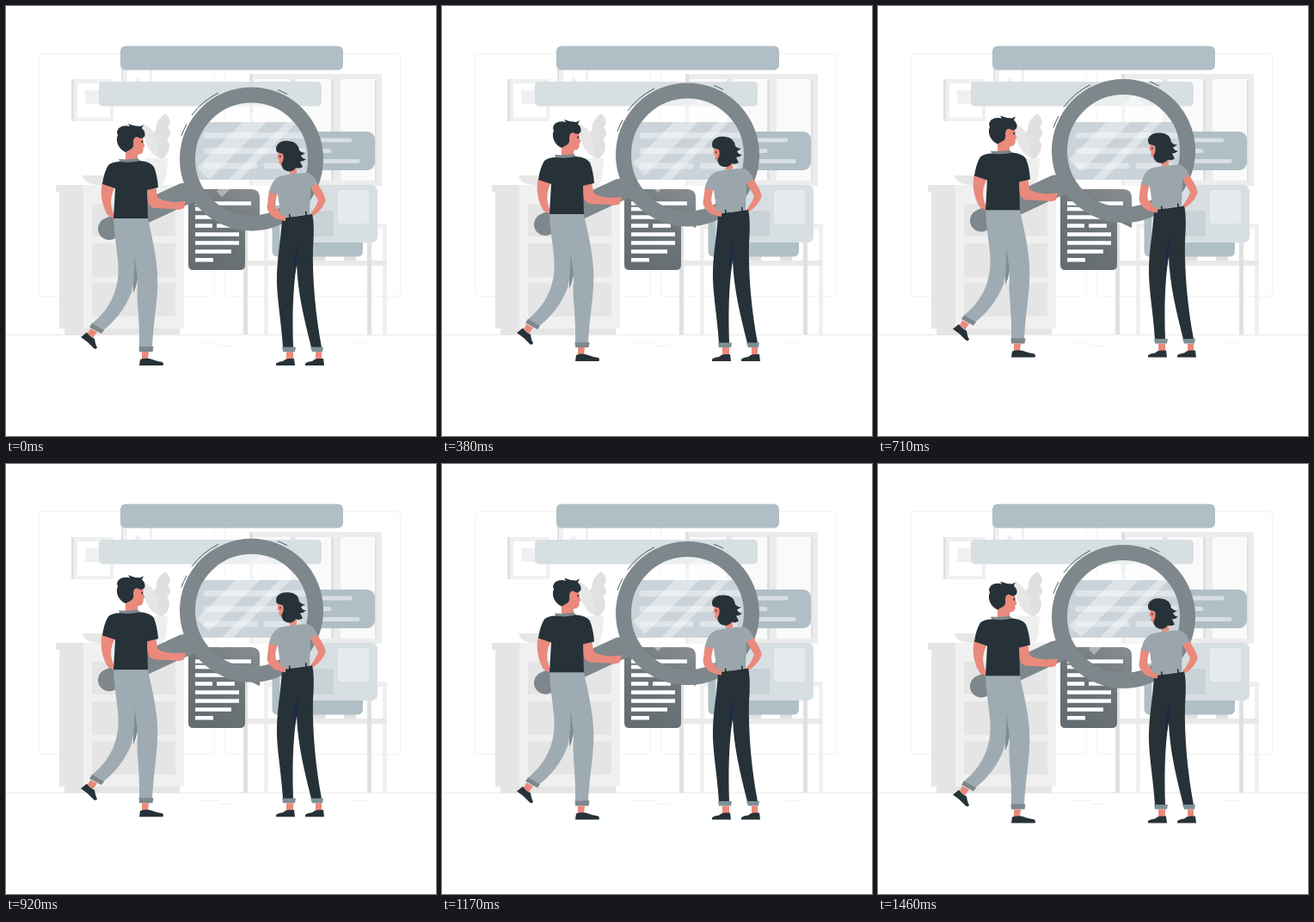
An HTML page for the animation above (1.5 s loop, 500x500 px).

```html
<!DOCTYPE html>
<html lang="en">
<head>
<meta charset="utf-8">
<title>Search illustration</title>
<style>
  html, body { margin: 0; width: 100%; height: 100%; overflow: hidden; background: #fff; }
  svg { display: block; width: 100%; height: 100%; }
  .skin { fill: #e98a7c; }
  .dark { fill: #263238; }
  .pants { fill: #9eabb2; }
  .cuff { fill: #7c888d; }
</style>
</head>
<body>
<svg viewBox="0 0 500 500">
  <defs>
    <linearGradient id="paper" x1="0.8" y1="0" x2="0.3" y2="1">
      <stop offset="0" stop-color="#858b8e"/>
      <stop offset="0.5" stop-color="#6d7478"/>
      <stop offset="1" stop-color="#666d72"/>
    </linearGradient>
    <clipPath id="lens"><circle id="lensClip" cx="285.5" cy="178" r="67"/></clipPath>
  </defs>

  <!-- Room -->
  <g fill="none" stroke="#f2f2f2">
    <rect x="38.500" y="55.500" width="204" height="282" rx="4"/>
    <rect x="254.500" y="55.500" width="204" height="282" rx="4"/>
    <path stroke="#ebebeb" d="M0 382.500H500"/>
    <path d="M222 391.500H248M248 395.500H264M400 391.500H420"/>
  </g>
  <path fill="#ececec" d="M283 79H437V209H283Z"/>
  <path fill="#fafafa" d="M288 85H331V203H288ZM338 85H378V203H338ZM389 85H430V203H389Z"/>
  <path fill="#e0e0e0" d="M283 79H287V209H283ZM331 85H334V203H331ZM378 85H381V203H378ZM429 85H431V203H429Z"/>
  <path fill="#f0f0f0" d="M76 85H125V134H76ZM134 70H170V110H134Z"/>
  <path fill="#fff" d="M83 90H121V130H83ZM141 70H167V108H141Z"/>
  <path fill="#e1e1e1" d="M76 85H79V134H76ZM134 70H136V110H134Z"/>
  <path fill="#f0f0f0" d="M92 98H110V114H92ZM153 81L158 90H148Z"/>

  <!-- Cabinet and plant -->
  <path fill="#e6e6e6" d="M160 137C173 143 180 158 179 177C166 172 158 155 160 137Z"/>
  <path fill="#e0e0e0" d="M185 125C192 131 192 137 188 141C192 146 192 151 187 155C192 160 191 174 180 178C174 170 178 161 176 156C170 151 172 146 175 143C173 137 179 129 185 125Z"/>
  <path fill="#efefef" d="M162 177H188Q188 199 182 209H168Q162 197 162 177Z"/>
  <path fill="#e6e6e6" d="M89 197H130V208H108Q92 208 89 197Z"/>
  <path fill="#f0f0f0" d="M90 208H212V216H207V375H90Z"/>
  <path fill="#e5e5e5" d="M58 208H90V375H62V216H58ZM68 375H202V382.500H68ZM100 230H197V268H100ZM100 276H197V315H100ZM100 322H197V361H100Z"/>

  <!-- Desk -->
  <path fill="#f0f0f0" d="M300 253H443V382H438V259H305V382H300Z"/>
  <path fill="#e9e9e9" d="M276 296H443V302H276Z"/>
  <path fill="#e0e0e0" d="M276 253H281V382H276ZM420 253H425V382H420ZM356 291H371V296H356ZM393 291H407V296H393Z"/>

  <!-- Floating panels -->
  <rect x="133" y="46.500" width="259" height="28" rx="6" fill="#b0bec5"/>
  <rect x="108" y="88" width="259" height="28.500" rx="5" fill="#d7dfe2"/>
  <rect x="310" y="146" width="119" height="45" rx="9" fill="#b0bec5"/>
  <g stroke="#d7dfe2" stroke-width="5" stroke-linecap="round">
    <path d="M340 156H400M340 168.500H376M340 180.500H409"/>
  </g>
  <rect x="309.500" y="232" width="105.500" height="59.500" rx="6" fill="#b0bec5"/>
  <rect x="318" y="208" width="114" height="67" rx="7" fill="#d7dfe2"/>
  <rect x="386" y="214" width="36" height="39" rx="3" fill="#e6ebed"/>
  <rect x="342" y="238" width="39" height="30" rx="2" fill="#c8d2d7"/>
  <path fill="url(#paper)" d="M218 213H285Q295 213 295 223V258L278 250V301Q278 307 272 307H218Q212 307 212 301V219Q212 213 218 213Z"/>
  <path stroke="#fff" stroke-width="4.500" d="M220 229.500H285M220 236H250M220 245.500H258M220 255.500H240M245 255.500H266M220 265.500H271M220 275.500H271M220 285.500H262M220 295.300H241"/>

  <!-- Magnified panel: stays still while the lens slides over it -->
  <g clip-path="url(#lens)">
    <path fill="#fff" fill-opacity=".5" d="M215 80H355V211H215Z"/>
    <path fill="#cbd3da" d="M215 135H355V202H215Z"/>
    <path stroke="#dee4e8" stroke-width="7" stroke-linecap="round" d="M233 150.500H345M233 168.500H345M233 186H289M303 186H340"/>
  </g>

  <g id="crew">
    <!-- Magnifier -->
    <g clip-path="url(#still)" fill="none" stroke="#fff" stroke-opacity=".38">
      <path stroke-width="20" d="M305 119L229 195"/>
      <path stroke-width="9" d="M333 134L248 219"/>
    </g>
    <g fill="none" stroke="#7e878b">
      <path stroke-width="26" stroke-linecap="round" d="M120 259L206 219"/>
      <path stroke-width="25" d="M200 222L215 216"/>
      <circle cx="285.500" cy="178" r="74.500" stroke-width="18"/>
    </g>
    <path fill="none" stroke="#455a64" d="M216 127A86.200 86.200 0 0 1 247 101M204 151A86.200 86.200 0 0 1 210 137.500M316 97.500A86.200 86.200 0 0 1 327 102.500"/>

    <!-- Man -->
    <path class="skin" d="M112 205L127 210C121 221 121 231 125 241V247L118 243C111 231 109 217 112 205Z"/>
    <path class="skin" d="M162 209L174 208L176 222Q180 227 197 228L209 227L207 235Q202 238 195 236L172 235Q166 233 165 228Z"/>
    <path class="skin" d="M139 163L149 151L159 150L160 159L161.500 163L159.500 165Q161 172 153 173L153 178Q146 183 139 178Z"/>
    <path class="dark" d="M139 170C130 166 127 156 130 150L129 147C130 141 136 138 144 140L142 137Q149 140 156 140L160 138L158 142Q163 147 161 152Q157 155 152 152Q148 153 148 158Q149 163 146 166Z"/>
    <path class="skin" d="M152 155Q147 155 149 162L153 164Z"/>
    <path class="dark" d="M157.500 156.500h1.500v2.500h-1.500ZM155 154l4-1v1Z"/>
    <path class="cuff" d="M131 178Q143 179 153 177L158 182L133 183Z"/>
    <path class="dark" d="M132 181Q144 183 156 180Q168 181 172 187Q176 197 177 211L164 214L165 247H125L127 212L112 207Q114 193 119 185Q124 181 132 181Z"/>
    <path fill="#7f8c93" d="M147 278L154 296Q155 320 148 334Z"/>
    <path class="pants" d="M125 247H165C171 276 178 300 176 332C174 358 171 375 170 397H155C156 365 151 340 153 325C153 308 149 296 148 281C150 300 150 316 146 333C138 353 126 367 112 378L99 370C111 361 124 345 128 327C135 305 126 278 125 247Z"/>
    <path class="cuff" d="M154.500 396H171.500L170.500 402H155ZM100 369L114 377L111 381L97 373.500Z"/>
    <path class="skin" d="M158 402H166L165 411H158ZM98 375L106 379L101 386L95 381Z"/>
    <path class="dark" d="M156 411Q161 409 167 410Q175 413 182 414Q184 417 182 418H155ZM87 385L94 379.500Q98 385 103 387Q104 394 106 397Q105 400 102 398Q95 390 87 385Z"/>

    <!-- Woman -->
    <path class="skin" d="M306 214L316 217Q312 229 314 235L325 244V250L313 247Q304 241 303.500 234Z"/>
    <path class="skin" d="M353 209L361 205Q372 221 371.500 227Q367 238 357 244L354 242Q361 233 363 226Z"/>
    <path class="skin" d="M317 168H330L338 184V194Q333 198 329 194L331 189L321 187L317 182L318 179L315.500 177Z"/>
    <path class="dark" d="M315 162Q319 156 329 157Q340 158 341 168Q344 171 348 171L343 174Q345 178 349 178Q346 181 342 181L345 187Q341 190 337 188Q334 193 327 192Q320 190 320.500 183Q324 178 322 172L315 170Q313 166 315 162Z"/>
    <path class="dark" d="M318 174h1.500v2h-1.500Z"/>
    <path fill="#9aa6ac" d="M318 198Q335 194 352 194Q359 198 362 206L354 211L353 242L320 247L316 219L306 217Q308 203 318 198Z"/>
    <path class="dark" d="M321 247L356 242Q359 253 357 281C356 317 360 360 367 397H355C347 365 339 333 338 300C333 333 333 365 334 397H322C320 365 314 335 315 312C316 287 320 270 321 247Z"/>
    <path fill="#1d2a45" d="M340 277Q333 291 334 309L336 311L338 300Q338 289 340 277Z"/>
    <path stroke="#1b2428" stroke-width="1.500" d="M329.500 242l1 6M348.500 239l1 6"/>
    <path class="skin" d="M320 244L325 243V250L319 249Z"/>
    <path fill="#7d9097" d="M321 396.500H337L336 402H322ZM354 396.500H369L368 402H356Z"/>
    <path class="skin" d="M326 402H334V411H326ZM360 402H367V411H360Z"/>
    <path id="shoe" class="dark" d="M314 416Q315 414 322 413Q325 410 329 410H335L336 418H314Z"/>
    <use href="#shoe" x="34"/>
  </g>
  <clipPath id="still"><circle cx="285.500" cy="178" r="67"/></clipPath>
</svg>
<script>
  const LOOP = 1500, RISE = 10;
  const crew = document.getElementById('crew');
  const lensClip = document.getElementById('lensClip');

  // Constant speed up for half the loop, then back down.
  function draw() {
    const t = performance.now() % LOOP / LOOP;
    const y = -RISE * (1 - Math.abs(1 - 2 * t));
    crew.setAttribute('transform', `translate(0 ${y})`);
    lensClip.setAttribute('cy', 178 + y);
    requestAnimationFrame(draw);
  }
  draw();
</script>
</body>
</html>
```
